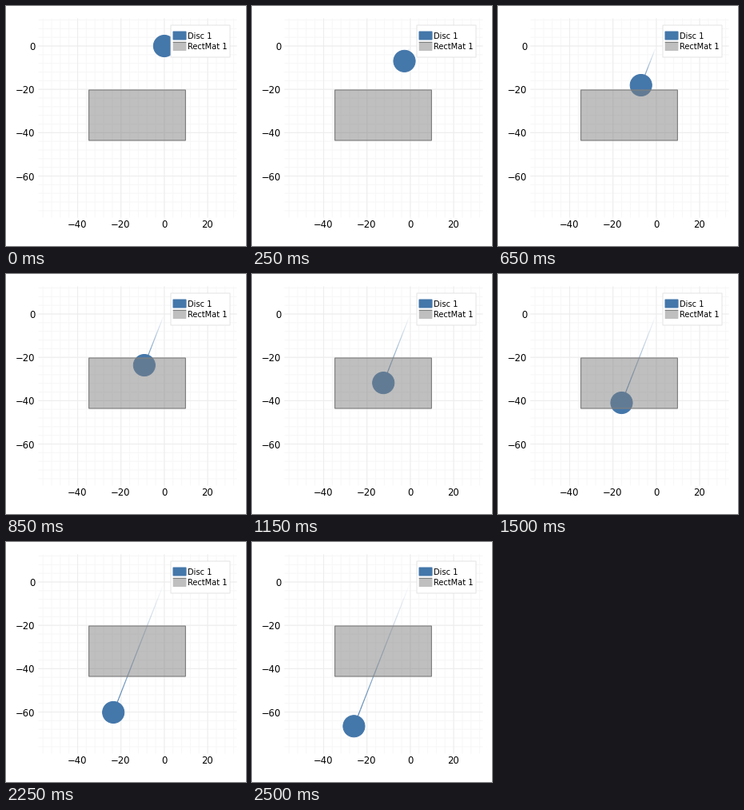
Recreate the animation shown at these times as a matplotlib script. Size 300 by 300 pixels, loop 2.55 s.

```python
import numpy as np
import matplotlib.pyplot as plt
from matplotlib.animation import FuncAnimation
from matplotlib.collections import LineCollection
from matplotlib.colors import to_rgb
from matplotlib.patches import Circle, Rectangle

SIZE, DPI = 300, 100
FRAMES, INTERVAL = 51, 50
PT = 72 / DPI                      # one pixel in points

SCALE = 2.709                      # pixels per data unit
ORIGIN = np.array([197.9, 50.0])
LEFT, RIGHT, TOP, BOTTOM = 41, 288, 16, 264
BLUE, GREY = "#4477AA", "#808080"

# Motion along the path, in vertical pixels per frame
SPEED_IN, SPEED_OUT = 3.77, 3.46
MAT_START, MAT_END = 55.5, 118.0
SLOPE = -0.391
T_IN = MAT_START / SPEED_IN
T_MAT = 2 * (MAT_END - MAT_START) / (SPEED_IN + SPEED_OUT)
DECEL = (SPEED_IN - SPEED_OUT) / T_MAT


def position(t):
    """Disc centre in pixels; friction acts only on the mat."""
    on_mat = np.clip(t - T_IN, 0, T_MAT)
    after = np.maximum(t - T_IN - T_MAT, 0)
    fall = (SPEED_IN * (np.minimum(t, T_IN) + on_mat)
            - DECEL * on_mat ** 2 / 2 + SPEED_OUT * after)
    return np.column_stack([ORIGIN[0] + SLOPE * fall, ORIGIN[1] + fall])


def px(x):
    return ORIGIN[0] + SCALE * x


def py(y):
    return ORIGIN[1] - SCALE * y


plt.rcParams["font.family"] = "DejaVu Sans"
plt.rcParams["path.snap"] = False
fig = plt.figure(figsize=(SIZE / DPI, SIZE / DPI), dpi=DPI, facecolor="white")
ax = fig.add_axes([0, 0, 1, 1])
ax.set_xlim(0, SIZE)
ax.set_ylim(SIZE, 0)
ax.axis("off")


def draw_grid(step, color):
    for value in range(-80, 41, step):
        x, y = px(value), py(value)
        if LEFT <= x <= RIGHT:
            ax.plot([x, x], [TOP, BOTTOM], color=color, lw=PT, zorder=0)
        if TOP <= y <= BOTTOM:
            ax.plot([LEFT, RIGHT], [y, y], color=color, lw=PT, zorder=0)


def draw_ticks():
    def text(value):
        return str(value).replace("-", "\u2212")

    for value in (-40, -20, 0, 20):
        ax.text(px(value) - 0.4, 272.2, text(value), fontsize=8.4,
                ha="center", va="center_baseline")
    for value in (-60, -40, -20, 0):
        ax.text(36.6, py(value), text(value), fontsize=8.4,
                ha="right", va="center_baseline")


def draw_legend():
    ax.add_patch(Rectangle((206, 24), 74, 40, fc="white", ec="#E4E4E4",
                           lw=PT, zorder=5))
    ax.add_patch(Rectangle((209, 32), 16, 10, fc=BLUE, ec=BLUE, lw=PT,
                           zorder=6))
    ax.add_patch(Rectangle((208.7, 45.5), 16.6, 10.5, fc="#BFBFBF", ec="none",
                           zorder=6))
    ax.plot([208.7, 225.3], [45.4, 45.4], color=GREY, lw=1.2 * PT, zorder=7,
            solid_capstyle="butt")
    for y, label in ((41, "Disc 1"), (54.5, "RectMat 1")):
        ax.text(227, y, label, fontsize=7.1, va="baseline", zorder=7)


draw_grid(4, "#F7F7F7")
draw_grid(20, "#EDEDED")
draw_ticks()
draw_legend()

trail = LineCollection([], linewidths=1.2 * PT, capstyle="butt", zorder=1)
ax.add_collection(trail)
disc = Circle(ORIGIN, 5 * SCALE, fc=BLUE, ec=BLUE, lw=PT, zorder=2)
ax.add_patch(disc)
ax.add_patch(Rectangle((103.6, 105), 120.8, 63, fc=(0.5, 0.5, 0.5, 0.5),
                       ec=GREY, lw=1.2 * PT, zorder=3))


def update(frame):
    points = position(np.arange(frame + 1))
    disc.center = tuple(points[-1])
    trail.set_segments(list(np.stack([points[:-1], points[1:]], axis=1)))
    trail.set_color([(*to_rgb(BLUE), i / frame) for i in range(frame)])
    return trail, disc


anim = FuncAnimation(fig, update, frames=FRAMES, interval=INTERVAL,
                     repeat=True, repeat_delay=0)
plt.show()
```
